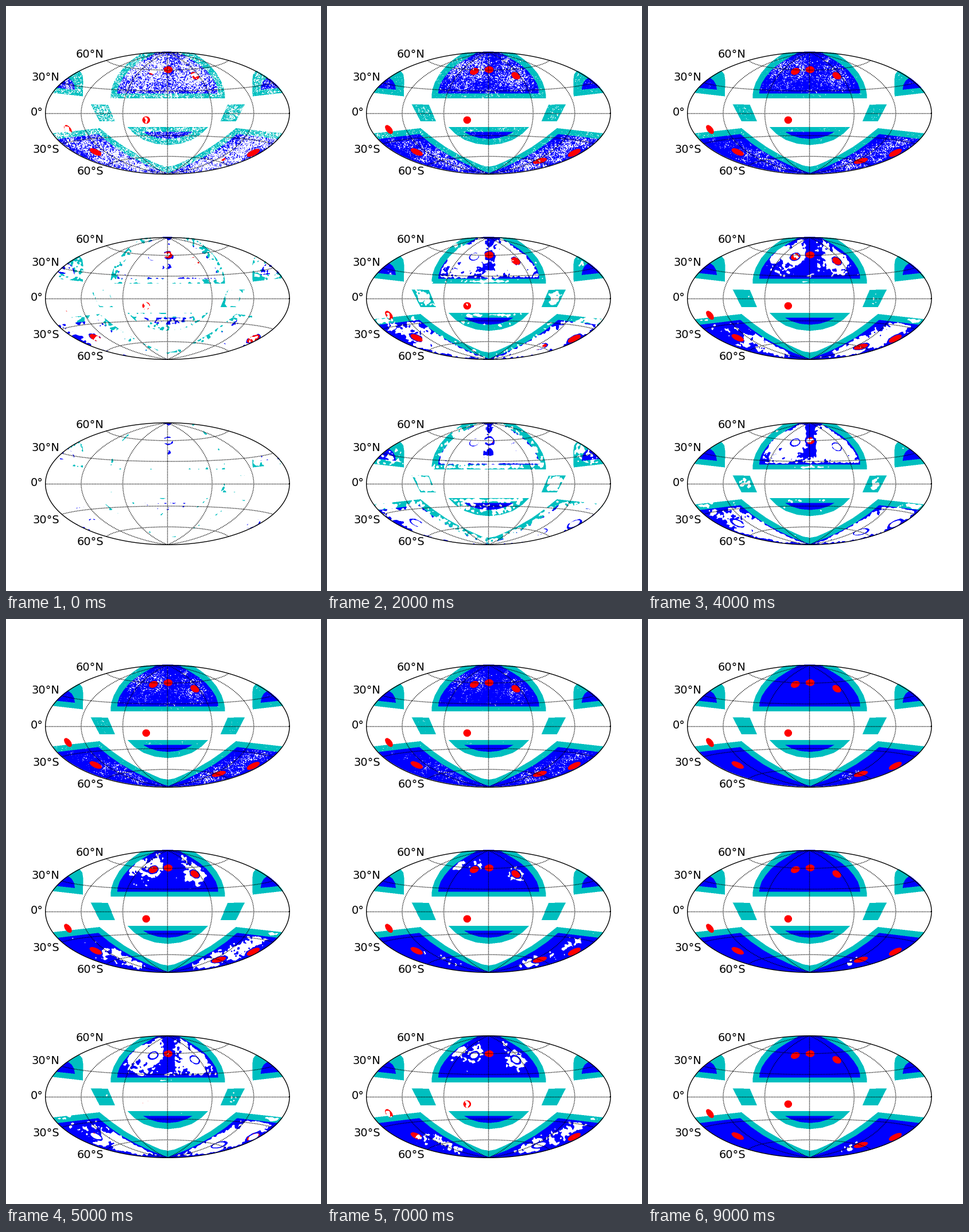
A matplotlib script that plays this animation: 549x1020 px, repeating every 10 s.

```python
import numpy as np
import matplotlib.pyplot as plt
from matplotlib.animation import FuncAnimation
from matplotlib.path import Path

W, H, DPI = 549, 1020, 100
STEPS = 10
CX, CY, RX, RY = 281.4, 187.0, 212.7, 106.35   # first map's ellipse
PITCH = 323                                    # distance between maps
X0, Y0, TW, TH, SS = 68, 80, 428, 214, 2       # tile box and supersampling

PALETTE = np.array([[1, 1, 1], [0, .75, .75], [0, 0, 1], [1, 0, 0]])
TEAL, BLUE, RED = 1, 2, 3

rng = np.random.default_rng(4)
xs = X0 + (np.arange(TW * SS) + .5) / SS
ys = Y0 + (np.arange(TH * SS) + .5) / SS
X, Y = np.meshgrid(xs, ys)
rho = np.hypot((X - CX) / RX, (Y - CY) / RY)


def smooth_noise(sigma):
    """Unit-variance Gaussian noise with blobs of about sigma pixels."""
    fy = np.fft.fftfreq(X.shape[0])[:, None]
    fx = np.fft.rfftfreq(X.shape[1])[None, :]
    s = sigma * SS
    spec = np.fft.rfft2(rng.standard_normal(X.shape))
    spec *= np.exp(-2 * (np.pi * s) ** 2 * (fx ** 2 + fy ** 2))
    out = np.fft.irfft2(spec, X.shape)
    return (out - out.mean()) / out.std()


def rotated(cx, cy, sx, sy, deg):
    a = np.radians(deg)
    dx, dy = X - cx, Y - cy
    return ((dx * np.cos(a) + dy * np.sin(a)) / sx,
            (dy * np.cos(a) - dx * np.sin(a)) / sy)


def bumps(*specs):
    """Sum of rotated Gaussians: (amp, cx, cy, sx, sy, deg)."""
    total = np.zeros_like(X)
    for amp, *shape in specs:
        u, v = rotated(*shape)
        total += amp * np.exp(-(u * u + v * v) / 2)
    return total


def mirror(points):
    return [(2 * CX - x, y) for x, y in reversed(points)]


def outline_distance(points):
    best = np.full(X.shape, 1e9)
    for (ax, ay), (bx, by) in zip(points, points[1:] + points[:1]):
        dx, dy = bx - ax, by - ay
        t = ((X - ax) * dx + (Y - ay) * dy) / max(dx * dx + dy * dy, 1e-9)
        t = np.clip(t, 0, 1)
        best = np.minimum(best, np.hypot(X - ax - t * dx, Y - ay - t * dy))
    return best


# Left halves or left copies of the survey regions
dome = [(182.5, 162), (182.5, 155), (184, 146), (188, 134), (197, 118),
        (209, 104), (222, 93), (238, 82), (240, 70)]
dome_core = [(194, 153.7), (194.5, 147), (198, 136), (205, 125), (215, 113),
             (227, 103), (241, 94), (255, 86), (265, 80), (266, 70)]
smile = [(281, 243.4), (260, 241), (240, 234.5), (223, 223.5), (211.5, 211.8)]
smile_core = [(281, 232.7), (265, 231), (250, 226.5), (239, 220.6)]
south = [(60, 300), (60, 225.5), (163, 214), (185, 231.5), (207, 247),
         (232, 261.5), (255, 272.5), (270, 279), (281, 281)]
south_core = [(60, 300), (60, 236.5), (161, 224.3), (180, 240), (201, 254.5),
              (226, 268.5), (252, 281), (281, 292)]
patch = [(60, 150), (134, 158.5), (134.5, 130), (133, 120), (129.5, 115.5),
         (124, 112), (60, 100)]
patch_core = [(60, 140.5), (120, 147), (118.5, 138), (114.5, 131),
              (108, 126), (60, 110)]
kite = [(147.5, 172.3), (177.5, 173), (190, 202), (163, 202)]

regions = [(h + mirror(h), TEAL, False) for h in (dome, smile, south)]
for shape in (patch, kite):
    regions += [(shape, TEAL, False), (mirror(shape), TEAL, False)]
regions += [(dome_core + mirror(dome_core), BLUE, True),
            (south_core + mirror(south_core), BLUE, True),
            (smile_core + mirror(smile_core), BLUE, False),
            (patch_core, BLUE, False), (mirror(patch_core), BLUE, False)]

label = np.zeros(X.shape, int)
edge = np.zeros_like(X)
deep = np.zeros(X.shape, bool)
grid_points = np.column_stack([X.ravel(), Y.ravel()])
for points, colour, is_deep in regions:
    inside = Path(points).contains_points(grid_points).reshape(X.shape)
    inside &= rho < 1
    dist = np.minimum(outline_distance(points), (1 - rho) * 100)
    label[inside] = colour
    edge[inside] = np.exp(-(dist[inside] / 2.6) ** 2)
    deep[inside] = is_deep

# Places that are slow to fill, and places that fill first
slow_deep = bumps(
    (1.0, 226, 106, 20, 8, -38), (1.0, 260, 110, 15, 8, -55),
    (.95, 330, 122, 16, 9, 40), (.35, 325, 128, 28, 18, 0),
    (.4, 235, 125, 25, 18, 0), (.9, 375, 268, 58, 9, -25),
    (.3, 352, 276, 12, 4, -20), (.3, 440, 240, 35, 8, -30),
    (.75, 205, 268, 40, 7, 28), (.5, 150, 255, 25, 5, 28))
slow_thin = bumps(
    (.9, 397, 188, 8, 8, 0), (.5, 168, 188, 8, 8, 0),
    (1.1, 92, 222, 12, 5, -6), (1.5, 465, 224, 14, 5, 6),
    (.9, 282, 159, 30, 2, 0), (.6, 281, 215, 30, 3, 0))
quick = bumps(
    (1.0, 282, 132, 6, 5, 0), (.9, 281, 92, 4, 14, 0),
    (.45, 281, 120, 9, 40, 0), (.5, 203, 146, 7, 5, 0),
    (.4, 333, 153, 35, 1.5, 0), (.3, 130, 238, 30, 12, -6))
last = bumps((1, 352, 273, 20, 4.5, -20))

# Discs: cx, cy, rx, ry, tilt, then fill time in each map
discs = [(282, 112, 7.3, 6, 0, -2, -1, 3.2),
         (256.7, 115, 8, 5.6, -22, .8, 3.5, 8.3),
         (328, 122.7, 8.4, 5.6, 32, -1, 0, 7.4),
         (244.3, 199.8, 6.7, 6.5, 0, -1.5, -.2, 6),
         (108, 216.3, 9, 5, 52, -.3, 1, 6.4),
         (156.3, 255.6, 11.5, 4.8, 25, -2, -.3, 6.4),
         (370, 271, 12.5, 4.3, -15, .4, 2.2, 8.3),
         (430, 257, 12.3, 4.8, -26, -2, -.5, 5.5)]

grain = smooth_noise(.45)
blobs = .8 * smooth_noise(1.5) + .6 * smooth_noise(5)
ranks = grain.ravel().argsort().argsort().reshape(X.shape)
wait = -np.log((ranks + .5) / ranks.size)

ring = np.zeros_like(X)
hole = np.zeros(X.shape, bool)
disc_radius = []
for d in discs:
    r = np.hypot(*rotated(*d[:5]))
    disc_radius.append(r)
    ring = np.maximum(ring, np.exp(-((r - 1.05) / .2) ** 2))
    hole |= r < .85
label[hole] = 0

slow = np.where(deep, slow_deep, slow_thin) * (1 - .5 * edge) * (1 - .8 * ring)
early = np.where(deep, .6 * edge + quick + .8 * ring, edge)


def fill_time(m):
    """Step at which each point of map m gets its colour."""
    if m == 0:
        scale = np.maximum(.3, 1 + 3 * slow * deep + .8 * slow - .4 * early)
        t = -1 + wait * scale * np.exp(.3 * blobs)
    else:
        base, hard, easy, rough = ((2.0, 5.5, 2.5, 1.1), (4.3, 4, 4, .9))[m - 1]
        thick = base + hard * slow - easy * early + rough * blobs
        base, easy = ((.8, .8), (2.0, 1.2))[m - 1]
        thin = base + 4 * slow - easy * early + .8 * blobs
        t = np.where(deep, thick, thin)
    cap = 8.4 + ((.7, .8, 1.2)[m] + .5 * blobs) * last
    return np.minimum(t, cap)


def disc_time(m):
    t = np.full(X.shape, 99.0)
    for d, r in zip(discs, disc_radius):
        own = np.minimum(d[5 + m] + 1.5 * (1 - r) + .8 * blobs, 8.9)
        t = np.where(r < 1, own, t)
    return t


times = [(fill_time(m), disc_time(m)) for m in range(3)]


def hammer(lon, lat):
    lon, lat = np.radians(lon), np.radians(lat)
    z = np.sqrt(1 + np.cos(lat) * np.cos(lon / 2))
    return (CX + RX * np.cos(lat) * np.sin(lon / 2) / z,
            CY - RY * np.sin(lat) / z)


# The small margin keeps the pixel size from being rounded down
fig = plt.figure(figsize=((W + .01) / DPI, (H + .01) / DPI), dpi=DPI,
                 facecolor="white")
ax = fig.add_axes([0, 0, 1, 1])
stage = np.ones((H, W, 3))
picture = ax.imshow(stage, extent=(0, W, H, 0), interpolation="nearest",
                    aspect="auto")
ax.set_xlim(0, W)
ax.set_ylim(H, 0)
ax.axis("off")

LABELS = [("60°N", 60, 90), ("30°N", 30, 130), ("0°", 0, 191),
          ("30°S", -30, 256), ("60°S", -60, 294)]


def draw_graticule(dy):
    span = np.linspace(-1, 1, 181)
    lines = [hammer(lon + 0 * span, 90 * span) for lon in range(-120, 121, 60)]
    lines += [hammer(180 * span, lat + 0 * span) for lat in range(-60, 61, 30)]
    for x, y in lines:
        ax.plot(x, y + dy, color="black", lw=1, ls=(0, (1, 1)),
                dash_capstyle="butt")
    a = np.linspace(0, 2 * np.pi, 361)
    ax.plot(CX + RX * np.cos(a), CY + RY * np.sin(a) + dy, color="black", lw=1)
    for text, lat, base in LABELS:
        x = CX - RX * np.cos(np.radians(lat)) - 4.25
        ax.text(x, base + dy, text, ha="right", va="baseline", fontsize=14,
                family="DejaVu Sans")


for m in range(3):
    draw_graticule(m * PITCH)


def update(step):
    for m, (fill, disc) in enumerate(times):
        shown = np.where(fill <= step, label, 0)
        shown[disc <= step] = RED
        tile = PALETTE[shown].reshape(TH, SS, TW, SS, 3).mean(axis=(1, 3))
        top = Y0 + m * PITCH
        stage[top:top + TH, X0:X0 + TW] = tile
    picture.set_data(stage)
    return [picture]


anim = FuncAnimation(fig, update, frames=STEPS, interval=1000, repeat=True,
                     repeat_delay=0, blit=False)
plt.show()
```
